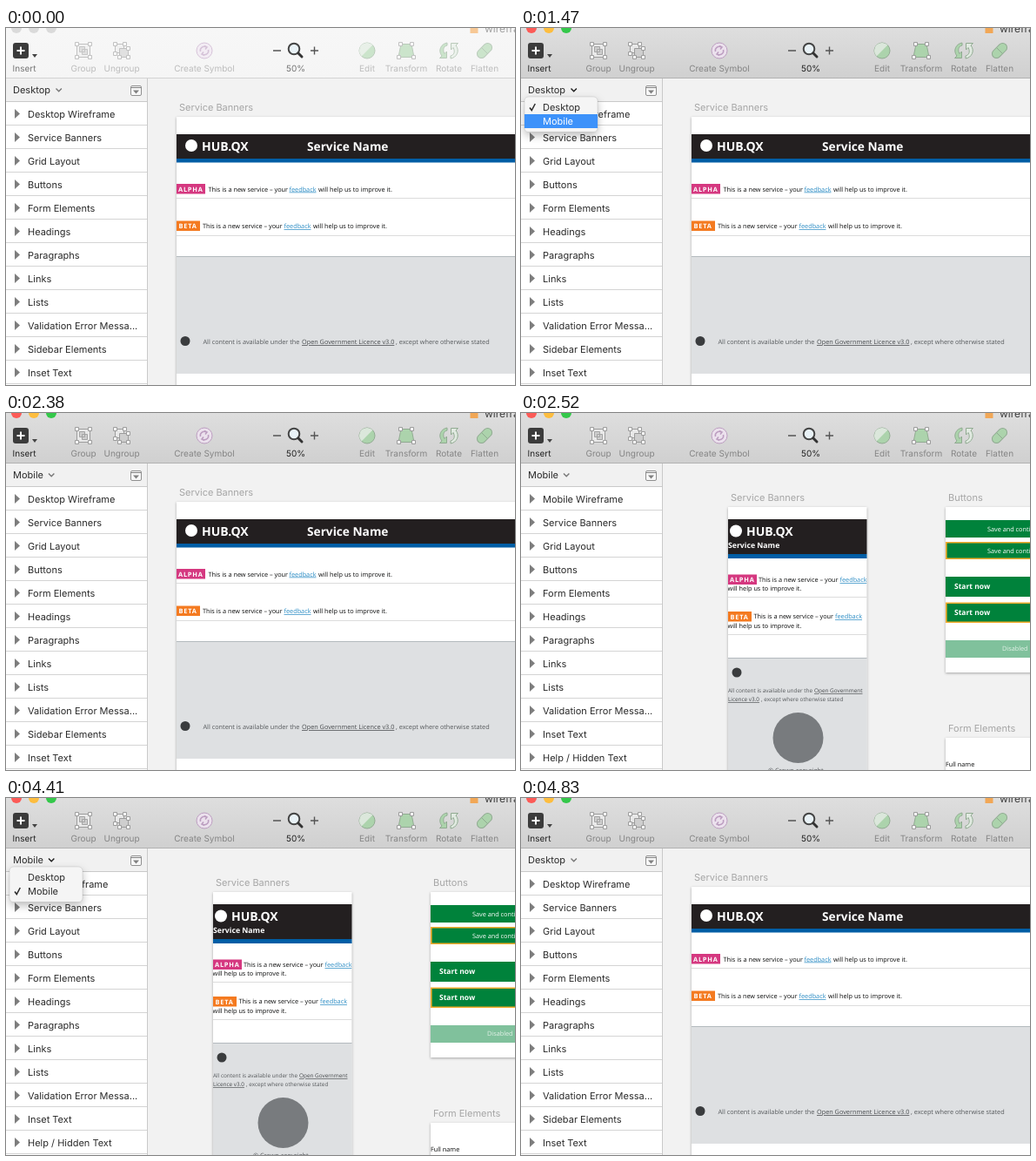
These frames come from a looping animation (585x410 px, 6230 ms). An HTML page:

```html
<!DOCTYPE html>
<html lang="en">
<head>
<meta charset="utf-8">
<title>Switching wireframe pages</title>
<style>
html, body { margin: 0; width: 100%; height: 100%; overflow: hidden; }
svg { display: block; width: 585px; height: 410px; font: 11px Inter, sans-serif; text-rendering: geometricPrecision; }

/* One loop is 89 ticks of 70 ms */
#stage, #menu, #rows, #pages, .label, .chevron { animation: 6230ms step-end infinite; }
#stage { animation-name: focus; }
#menu { animation-name: menu, rows; }
.label { animation-name: label; }
#rows { animation-name: list; }
#pages { animation-name: page; }
.chevron { animation-name: chevron; fill: none; stroke-width: 1.4; }

@keyframes focus {
  0% { --top: #f7f7f7; --bottom: #f5f5f5; --edge: #d3d3d3; --ink: #757575; --dim: #bdbdbd; --fade: .5;
       --red: #dadada; --amber: #dadada; --green: #dadada; --title: #a0a0a0; }
  16.8539% { --top: #dedede; --bottom: #d0d0d0; --edge: #b2b2b2; --ink: #222; --dim: #858585; --fade: .8;
       --red: #fc5b57; --amber: #fdbd3e; --green: #34c84a; --title: #3c3c3c; }
}
@keyframes menu {
  0% { opacity: 0; }
  15.7303% { opacity: 1; }
  34.8314% { opacity: .75; }
  35.955% { opacity: .45; }
  37.0786% { opacity: .15; }
  38.2022% { opacity: 0; }
  55.0561% { opacity: 1; }
  73.0337% { opacity: .75; }
  74.1573% { opacity: .45; }
  75.2808% { opacity: .15; }
  76.4044% { opacity: 0; }
}
@keyframes rows {
  0%, 32.5842%, 38.2022%, 70.7865%, 76.4044% { --bg1: transparent; --fg1: #2b2b2b; --bg2: transparent; --fg2: #2b2b2b; }
  22.4719%, 62.9213%, 71.9101% { --bg1: #3d92fa; --fg1: #fff; --bg2: transparent; --fg2: #2b2b2b; }
  23.5955%, 33.7078% { --bg1: transparent; --fg1: #2b2b2b; --bg2: #3d92fa; --fg2: #fff; }
}
@keyframes label { 0%, 76.4044% { --desk: 1; } 38.2022% { --desk: 0; } }
@keyframes list { 0%, 77.5280% { --desk: 1; } 39.3258% { --desk: 0; } }
@keyframes page { 0%, 77.5280% { --desk: 1; } 40.4494% { --desk: 0; } }
@keyframes chevron { 0%, 38.2022%, 76.4044% { stroke: #777; } 16.8539%, 55.0561% { stroke: #1c1c1c; } }

.desk { opacity: var(--desk); }
.mob { opacity: calc(1 - var(--desk)); }

.bar-top { stop-color: var(--top); }
.bar-bottom { stop-color: var(--bottom); }
.tools { font-size: 10px; text-anchor: middle; fill: var(--ink); }
.tools .off { fill: var(--dim); }
.icons { opacity: var(--fade); }
.side { fill: #2b2b2b; }
.head { fill: #a6a6a6; }
.board { fill: #fff; filter: drop-shadow(0 1px 1.5px rgba(0, 0, 0, .32)); }
.copy { font: 7.3px "Open Sans", sans-serif; fill: #0b0c0c; }
.foot { fill: #55585b; }
.foot .link { fill: #45484b; text-decoration: underline; }
.copy .blue { fill: #2b8cc4; text-decoration: underline; }
.bold { font-weight: 700; fill: #fff; }
.tag { font-weight: 700; font-size: 7.4px; letter-spacing: .8px; fill: #fff; }
.white { fill: #fff; }
.go { fill: #00823b; }
.focus { stroke: #f5ac2d; stroke-width: 1.6; }
.rule { stroke: #dcdcdc; }
</style>
</head>
<body>
<svg id="stage" viewBox="0 0 585 410">
  <defs>
    <linearGradient id="bar" x2="0" y2="1"><stop class="bar-top"/><stop class="bar-bottom" offset="1"/></linearGradient>
    <pattern id="row" y="85" width="162" height="27" patternUnits="userSpaceOnUse">
      <path fill="#fff" d="M0 0h162v27H0z"/>
      <path fill="#7d7d7d" d="M10 8l6 5.5-6 5.5z"/>
      <path fill="#d4d4d4" d="M0 26h162v1H0z"/>
    </pattern>
    <clipPath id="phone"><path d="M238 108h159.500v302H238z"/></clipPath>
    <g id="handles" fill="#fff" stroke="#8e8e8e">
      <path d="M-7.500-7.500h15v15h-15z" fill="#eee"/>
      <path d="M-9.500-9.500h4v4h-4zM5.500-9.500h4v4h-4zM-9.500 5.500h4v4h-4zM5.500 5.500h4v4h-4z"/>
    </g>
  </defs>

  <path fill="#f2f2f2" d="M0 0h585v410H0z"/>

  <g id="pages">
    <g class="desk">
      <text class="head" x="199" y="95">Service Banners</text>
      <path class="board" d="M196 102h400v320H196z"/>
      <path fill="#231f20" d="M196 122h389v28H196z"/>
      <path fill="#005ea5" d="M196 150h389v4.500H196z"/>
      <circle class="white" cx="213" cy="135" r="7"/>
      <path class="rule" d="M196 195.500h389M196 238.500h389"/>
      <path fill="#dee0e2" d="M196 262h389v135H196z"/>
      <path stroke="#b4babe" d="M196 262.500h389"/>
      <path fill="#d53880" d="M196 179h33v11.500h-33z"/>
      <path fill="#f47a20" d="M196 221.500h27V233h-27z"/>
      <circle cx="206" cy="359.500" r="5.500" fill="#3a3c3e"/>
      <g class="copy">
        <text class="bold" font-size="14.200" style="font-size:14px" x="225" y="140.500">HUB.QX</text>
        <text class="bold" style="font-size:13.700px" x="346" y="140.500">Service Name</text>
        <text class="tag" x="198" y="187.700">ALPHA</text>
        <text class="tag" x="198.500" y="230.200">BETA</text>
        <text y="187.500"><tspan x="232.500">This is a new service – your</tspan><tspan class="blue" x="325.500">feedback</tspan><tspan x="359">will help us to improve it.</tspan></text>
        <text y="230"><tspan x="226">This is a new service – your</tspan><tspan class="blue" x="319.500">feedback</tspan><tspan x="353">will help us to improve it.</tspan></text>
        <text class="foot" y="363"><tspan x="226.500">All content is available under the</tspan><tspan class="link" x="340">Open Government Licence v3.0</tspan><tspan x="448">, except where otherwise stated</tspan></text>
      </g>
    </g>

    <g class="mob">
      <text class="head" x="241" y="101">Service Banners</text>
      <text class="head" x="491" y="101">Buttons</text>
      <text class="head" x="491" y="366">Form Elements</text>
      <path class="board" d="M238 108h159.500v310H238z"/>
      <path class="board" d="M488 108h110v190H488z"/>
      <path class="board" d="M488 373h110v50H488z"/>
      <g clip-path="url(#phone)" class="copy">
        <path fill="#231f20" d="M238 122h160v40H238z"/>
        <path fill="#005ea5" d="M238 162h160v5H238z"/>
        <circle class="white" cx="247" cy="135.500" r="7"/>
        <path class="rule" d="M238 211.500h160M238 254.500h160"/>
        <path fill="#dee0e2" d="M238 281h160v130H238z"/>
        <path stroke="#b4babe" d="M238 281.500h160"/>
        <path fill="#d53880" d="M238 185.500h33V197h-33z"/>
        <path fill="#f47a20" d="M238 228h27v11.500h-27z"/>
        <circle cx="248" cy="298" r="5.500" fill="#3a3c3e"/>
        <circle cx="318.500" cy="373" r="29" fill="#787b7e"/>
        <text class="bold" style="font-size:14px" x="259" y="140.500">HUB.QX</text>
        <text class="bold" style="font-size:8.700px" x="238" y="155">Service Name</text>
        <text class="tag" x="240" y="194">ALPHA</text>
        <text class="tag" x="240.500" y="236.500">BETA</text>
        <text y="194"><tspan x="273">This is a new service – your</tspan><tspan class="blue" x="366.500">feedback</tspan></text>
        <text x="237.500" y="204">will help us to improve it.</text>
        <text y="236"><tspan x="267.500">This is a new service – your</tspan><tspan class="blue" x="361">feedback</tspan></text>
        <text x="237.500" y="246.500">will help us to improve it.</text>
        <g class="foot" style="font-size:6.400px">
          <text y="321"><tspan x="238">All content is available under the</tspan><tspan class="link" x="337">Open Government</tspan></text>
          <text y="331"><tspan class="link" x="238">Licence v3.0</tspan><tspan x="276">, except where otherwise stated</tspan></text>
        </g>
        <text class="foot" x="284" y="412.500">© Crown copyright</text>
      </g>
      <path class="go" d="M488 123h97v20h-97zM488 188h97v23h-97z"/>
      <path class="go focus" d="M488.800 148.800h110v18.400h-110zM488.800 218.300h110v21.900h-110z"/>
      <path fill="#80c19c" d="M488 261h97v20h-97z"/>
      <g class="copy white">
        <text class="white" x="536" y="136">Save and continue</text>
        <text class="white" x="536" y="160.500">Save and continue</text>
        <text class="bold" style="font-size:8.500px" x="498" y="202">Start now</text>
        <text class="bold" style="font-size:8.500px" x="498" y="231.500">Start now</text>
        <text fill="#e4f2e9" style="fill:#e4f2e9" x="553" y="273">Disabled</text>
      </g>
      <text class="copy" x="488" y="406">Full name</text>
    </g>
  </g>

  <path fill="url(#row)" d="M0 85h162v325H0z"/>
  <g id="rows" class="side">
    <g class="desk">
      <text x="25" y="103">Desktop Wireframe</text>
      <text x="25" y="373">Sidebar Elements</text>
      <text x="25" y="400">Inset Text</text>
    </g>
    <g class="mob">
      <text x="25" y="103">Mobile Wireframe</text>
      <text x="25" y="373">Inset Text</text>
      <text x="25" y="400">Help / Hidden Text</text>
    </g>
    <text y="103"><tspan x="25" dy="27">Service Banners</tspan><tspan x="25" dy="27">Grid Layout</tspan><tspan x="25" dy="27">Buttons</tspan><tspan x="25" dy="27">Form Elements</tspan><tspan x="25" dy="27">Headings</tspan><tspan x="25" dy="27">Paragraphs</tspan><tspan x="25" dy="27">Links</tspan><tspan x="25" dy="27">Lists</tspan><tspan x="25" dy="27">Validation Error Messa...</tspan></text>
  </g>
  <path fill="#f1f1f1" d="M0 58h162v26H0z"/>
  <path stroke="#c9c9c9" d="M0 84.500h162M162.500 58v352"/>
  <g class="label side">
    <g class="desk"><text x="8" y="75">Desktop</text><path class="chevron" d="M57.500 69.500l3.200 3.200 3.200-3.200"/></g>
    <g class="mob"><text x="8" y="75">Mobile</text><path class="chevron" d="M49 69.500l3.200 3.200 3.200-3.200"/></g>
  </g>
  <rect x="143.500" y="66.500" width="12" height="11" rx="1.500" fill="#f7f7f7" stroke="#909090"/>
  <path fill="#808080" d="M146 71.500h7l-3.500 4zM144 68h11v1h-11z"/>

  <path fill="url(#bar)" d="M0 0h585v57H0z"/>
  <path d="M0 57.500h585" style="stroke:var(--edge)"/>
  <circle cx="12" r="6" style="fill:var(--red)"/>
  <circle cx="32" r="6" style="fill:var(--amber)"/>
  <circle cx="52" r="6" style="fill:var(--green)"/>
  <path fill="#f79a35" d="M533.500-3h9v9h-9z" style="opacity:var(--fade)"/>
  <text x="550" y="5" font-size="12" style="fill:var(--title)">wireframes</text>

  <rect x="8" y="17" width="18" height="18" rx="3" fill="#3b3b3b"/>
  <path stroke="#fff" stroke-width="2" d="M12.500 26h9M17 21.500v9"/>
  <path fill="#444" d="M30 30h6l-3 4z"/>
  <g class="icons">
    <g transform="translate(89 26)"><use href="#handles"/><path d="M-4.500-4.500h6v6h-6zM-1.500-1.500h6v6h-6z" fill="#ccc" stroke="#999"/></g>
    <g transform="translate(133 26)" fill="#eee" stroke="#8e8e8e">
      <path d="M-7.500-7.500h10v10h-10z"/><path d="M-2.500-2.500h10v10h-10z" fill="#ccc"/>
      <path fill="#fff" d="M-9.500-9.500h4v4h-4zM1.500-9.500h4v4h-4zM-9.500 1.500h4v4h-4zM5.500 5.500h4v4h-4zM5.500-4.500h4v4h-4zM-4.500 5.500h4v4h-4z"/>
    </g>
    <g transform="translate(228 26)" fill="none" stroke="#b58fba">
      <circle r="9" fill="#f1e4f3"/>
      <path stroke-width="1.500" d="M-4.500 1A4.600 4.600 0 0 1 2.500-4M4.500-1A4.600 4.600 0 0 1-2.500 4M0-5.500l3 1.500-2 2.500M0 5.500l-3-1.500 2-2.500"/>
    </g>
    <g stroke="#7f9f80" fill="#a2d3a2">
      <circle cx="415" cy="26" r="9"/>
      <path fill="#dcebdc" stroke="none" d="M408.600 32.400A9 9 0 0 1 421.400 19.600z"/>
      <path d="M454 18.500h12l3 15h-18z"/>
      <path fill="#fff" stroke="#8e8e8e" d="M451.500 16.500h4v4h-4zM464.500 16.500h4v4h-4zM449.500 31.500h4v4h-4zM466.500 31.500h4v4h-4z"/>
      <path d="M507 17C500 18 496 26 501 32l-2.500 2.500h8V27l-2.500 2.500C501.500 25 503 21 507 20z"/>
      <path fill="#e3efe3" d="M511 35c7-1 11-9 6-15l2.500-2.500h-8V25l2.500-2.500C516.500 27 515 31 511 32z"/>
      <rect x="540" y="21" width="20" height="10" rx="5" transform="rotate(-45 550 26)"/>
      <path fill="none" d="M546.500 22.500l7 7"/>
    </g>
  </g>
  <path stroke="#555" stroke-width="1.400" d="M307 26h9M350 26h9M354.500 21.500v9"/>
  <circle cx="331" cy="24" r="6.300" fill="#e9f2f7" stroke="#444" stroke-width="2"/>
  <path stroke="#333" stroke-width="3" stroke-linecap="round" d="M336 29l4 4"/>
  <g class="tools">
    <text x="21" y="50">Insert</text>
    <text x="333" y="50">50%</text>
    <g class="off">
      <text x="89" y="50">Group</text>
      <text x="133" y="50">Ungroup</text>
      <text x="228" y="50">Create Symbol</text>
      <text x="415" y="50">Edit</text>
      <text x="460" y="50">Transform</text>
      <text x="509" y="50">Rotate</text>
      <text x="550" y="50">Flatten</text>
    </g>
  </g>

  <g id="menu">
    <rect x="4" y="79" width="84" height="40.500" rx="4.500" fill="#f5f5f5" stroke="#000" stroke-opacity=".16" stroke-width=".6" style="filter:drop-shadow(0 4px 5px rgba(0,0,0,.26))"/>
    <path d="M4 83h84v16H4z" style="fill:var(--bg1)"/>
    <path d="M4 99h84v16H4z" style="fill:var(--bg2)"/>
    <text x="25" y="95" style="fill:var(--fg1)">Desktop</text>
    <text x="25" y="111" style="fill:var(--fg2)">Mobile</text>
    <g class="label" fill="none" stroke-width="1.500">
      <path class="desk" d="M10 91.500l2.300 3 4-7.500" style="stroke:var(--fg1)"/>
      <path class="mob" d="M10 107.500l2.300 3 4-7.500" style="stroke:var(--fg2)"/>
    </g>
  </g>
</svg>
</body>
</html>
```
